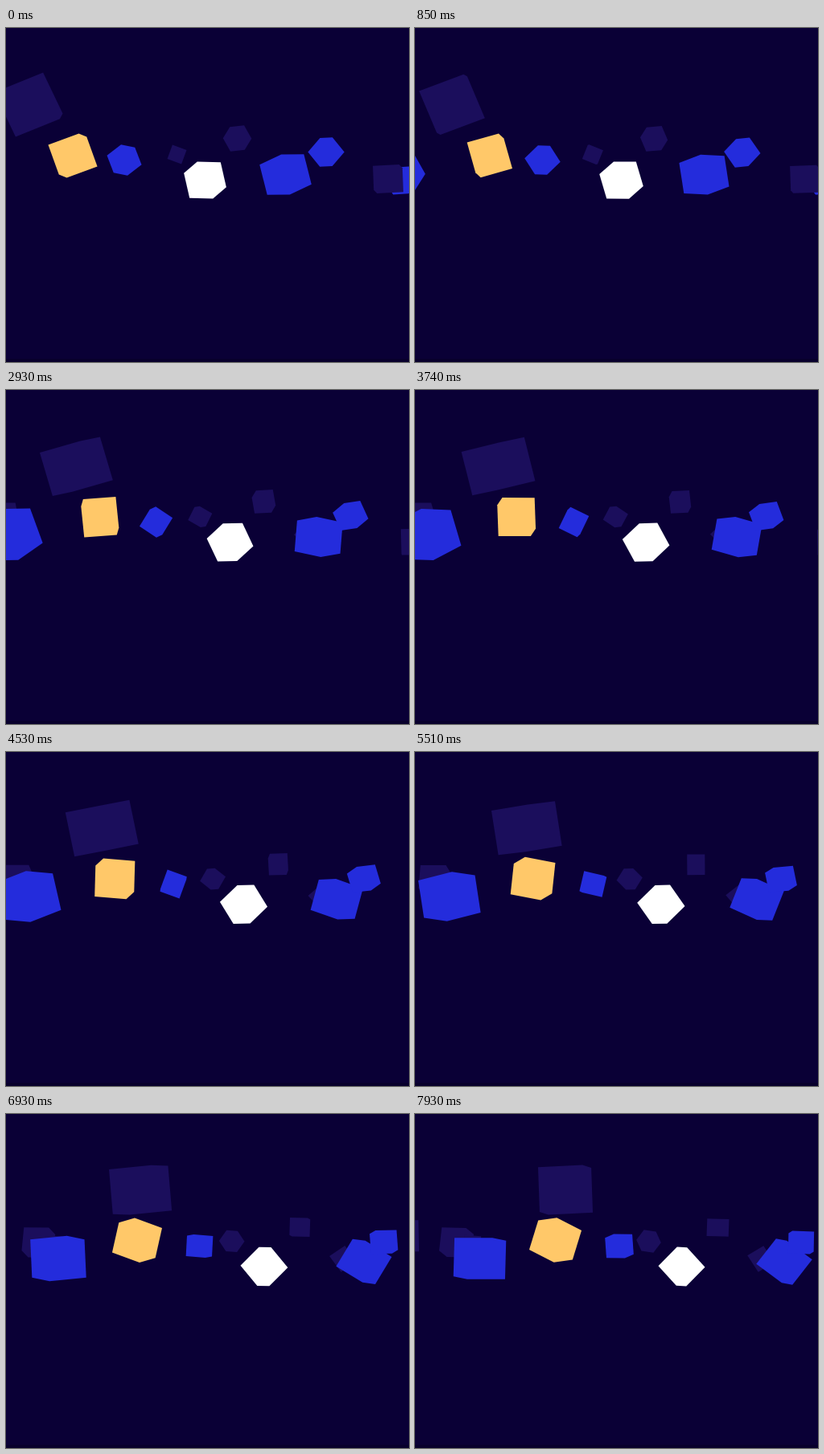
An HTML page that plays this animation: 501x416 px, repeating every 7.99 s.

```html
<!DOCTYPE html>
<html lang="en">
<head>
<meta charset="utf-8">
<title>Drifting cubes</title>
<style>
  html, body { margin: 0; width: 100%; height: 100%; overflow: hidden; background: #0a0036; }
  svg { display: block; width: 501px; height: 416px; }
</style>
</head>
<body>
<svg id="stage" viewBox="0 0 501 416">
  <rect width="501" height="416" fill="#0a0036"/>
  <rect y="412" width="501" height="4" fill="#08002c"/>
</svg>
<script>
const LOOP = 7990, DRIFT = 7930;
const DUSK = '#1b0e5c', BLUE = '#242cdc', GOLD = '#ffc869', WHITE = '#fff';
const stage = document.getElementById('stage');
const cubes = [];

// Poses are [x, y, yaw, pitch, roll], angles in degrees.
function cube(fill, size, from, to) {
  const node = document.createElementNS('http://www.w3.org/2000/svg', 'polygon');
  node.setAttribute('fill', fill);
  stage.append(node);
  cubes.push({ node, size, from, to });
}

// The three edge directions of a turned unit cube, seen from the front.
function edges(...degrees) {
  const [yaw, pitch, roll] = degrees.map(d => d * Math.PI / 180);
  const { sin, cos } = Math;
  return [
    [cos(yaw), sin(yaw) * sin(pitch)],
    [0, cos(pitch)],
    [sin(yaw), -cos(yaw) * sin(pitch)]
  ].map(([x, y]) => [x * cos(roll) - y * sin(roll), x * sin(roll) + y * cos(roll)]);
}

function corners(size, [x, y, ...angles]) {
  const stretch = 1 + ((x - 250) / 800) ** 2; // wide lens: broader towards the sides
  const sides = edges(...angles);
  return Array.from({ length: 8 }, (_, bits) => {
    const sum = axis => sides.reduce((s, e, i) => s + (bits >> i & 1 ? e[axis] : -e[axis]), 0);
    return [x + sum(0) * size / 2 * stretch, y + sum(1) * size / 2];
  });
}

function hull(points) {
  const sorted = points.sort((a, b) => a[0] - b[0] || a[1] - b[1]);
  const turn = (o, a, b) => (a[0] - o[0]) * (b[1] - o[1]) - (a[1] - o[1]) * (b[0] - o[0]);
  const half = list => {
    const chain = [];
    for (const p of list) {
      while (chain.length > 1 && turn(chain.at(-2), chain.at(-1), p) <= 0) chain.pop();
      chain.push(p);
    }
    return chain.slice(0, -1);
  };
  return [...half(sorted), ...half(sorted.reverse())];
}

function draw(now) {
  const progress = (now % LOOP) / DRIFT;
  for (const { node, size, from, to } of cubes) {
    const pose = from.map((v, i) => v + (to[i] - v) * progress);
    const outline = hull(corners(size, pose));
    node.setAttribute('points', outline.map(p => p.map(v => v.toFixed(2))).join(' '));
  }
}

// Far layer
cube(BLUE, 24, [491, 190, 32, 35, 38], [640, 190, 10, 10, 38]);
cube(DUSK, 56, [29, 95.5, 96, 5, -24], [187, 94.5, 11, -4, -2]);
cube(DUSK, 18.7, [212.5, 157.5, 0, 0, 20], [290.5, 158.5, 45, 33, 37]);
cube(DUSK, 21.7, [287.5, 137.5, 37, -35, -96], [376.5, 141.5, 0, 15, -88]);
cube(DUSK, 30.5, [475, 188, 7, -8, -2], [565, 191, -10, 4, 0]);
cube(DUSK, 22.5, [342, 180, 0, 0, 35], [430, 180.5, 5, 0, 58]);
cube(DUSK, 30, [-37, 160, -4, -28, 0], [51.5, 160, 19, -14, 6]);
cube(DUSK, 20, [-28, 165, 0, 0, 0], [71, 161.5, 0, 0, 4]);
cube(DUSK, 39, [-112, 152, 0, 0, 0], [-17, 152, 0, 0, -1]);

// Near layer
cube(BLUE, 48, [-43, 180, 62, -28, -30], [80.5, 180, 20, -4, 1.5]);
cube(BLUE, 25.5, [147, 164.5, 31, 31, 52], [254, 164.5, -26, -10, -4]);
cube(BLUE, 39.5, [347.5, 182.5, 47, 13, -14], [459, 184, 17, 8, 36]);
cube(BLUE, 25.3, [398, 154.5, 61, 23, -38], [480, 160, 10, 7, 1]);
cube(GOLD, 39.7, [83, 159, 11, -10, -19], [174.5, 157, -32, -17, 17]);
cube(WHITE, 34.2, [247.5, 189.5, 35, 50, 49], [331.5, 190, 16, 14, 44]);

const start = performance.now();
(function tick() {
  draw(performance.now() - start);
  requestAnimationFrame(tick);
})();
</script>
</body>
</html>
```
